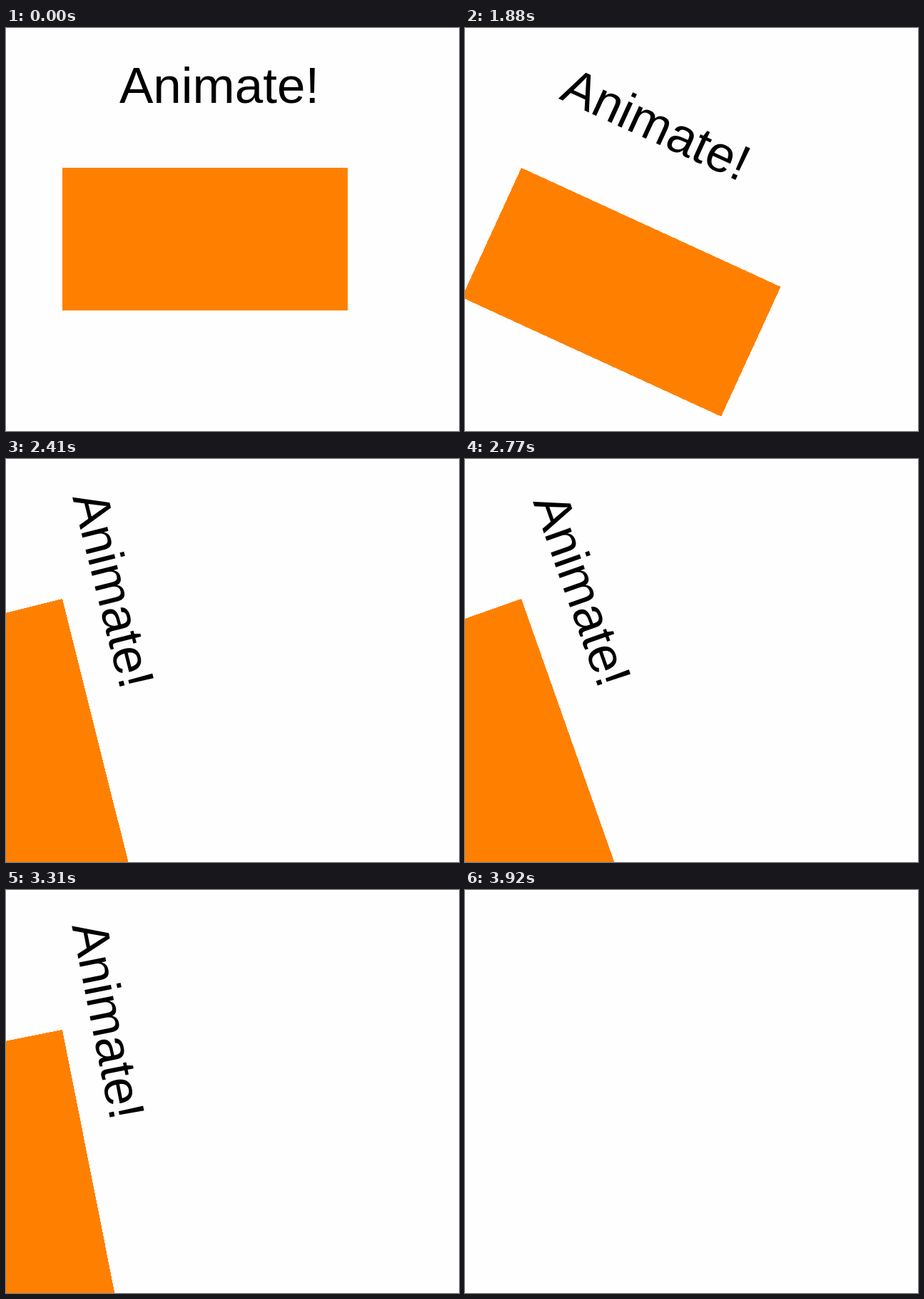
An HTML page for the animation above (5720 ms loop, 635 by 565 pixels).

```html
<!DOCTYPE html>
<html lang="en">
<head>
<meta charset="utf-8">
<title>Hinge</title>
<style>
  html, body { margin: 0; width: 100%; height: 100%; overflow: hidden; background: #fefefe; }
  svg { display: block; width: 635px; height: 565px; }
  rect { fill: #ff8000; shape-rendering: crispEdges; }
  text { font: 71px "Liberation Sans", Arial, Helvetica, sans-serif; fill: #000; }
</style>
</head>
<body>
<svg viewBox="0 0 635 565">
  <rect id="box" x="79" y="196" width="400" height="200"/>
  <text id="label" x="159" y="105">Animate!</text>
</svg>
<script>
  const LOOP = 5720, FIRST = 1700, LAST = 3920;
  const START = 1687.5, SWING = 500, DROP = 1370;
  const ANGLES = [0, 80, 70, 80, 70];
  const hinges = [
    { el: document.getElementById('box'), x: 79, y: 196 },
    { el: document.getElementById('label'), x: 159, y: 37 }
  ];

  // The picture advances in 90 ms ticks, a few of them 80 ms.
  const ticks = [];
  for (let t = FIRST, i = 0; t <= LAST; i++) {
    ticks.push(t);
    t += [6, 18, 24].includes(i) ? 80 : 90;
  }

  // cubic-bezier(.42, 0, .58, 1)
  function easeInOut(p) {
    if (p <= 0) return 0;
    if (p >= 1) return 1;
    let lo = 0, hi = 1;
    for (let i = 0; i < 24; i++) {
      const s = (lo + hi) / 2, r = 1 - s;
      const x = 1.26 * s * r * r + 1.74 * s * s * r + s * s * s;
      if (x < p) lo = s; else hi = s;
    }
    return lo * lo * (3 - 2 * lo);
  }

  function poseAt(time) {
    const phase = (time - START) / SWING;
    if (phase <= 0) return { angle: 0, drop: 0 };
    const leg = Math.floor(phase);
    if (leg >= ANGLES.length - 1) {
      return { angle: 70, drop: DROP * easeInOut(phase - ANGLES.length + 1) };
    }
    const from = ANGLES[leg], to = ANGLES[leg + 1];
    return { angle: from + (to - from) * easeInOut(phase - leg), drop: 0 };
  }

  function draw() {
    const now = performance.now() % LOOP;
    const held = ticks.filter(t => t <= now).pop() || 0;
    const { angle, drop } = poseAt(held);
    for (const { el, x, y } of hinges) {
      el.setAttribute('transform',
        `translate(0 ${drop.toFixed(2)}) rotate(${angle.toFixed(3)} ${x} ${y})`);
    }
    requestAnimationFrame(draw);
  }
  draw();
</script>
</body>
</html>
```
